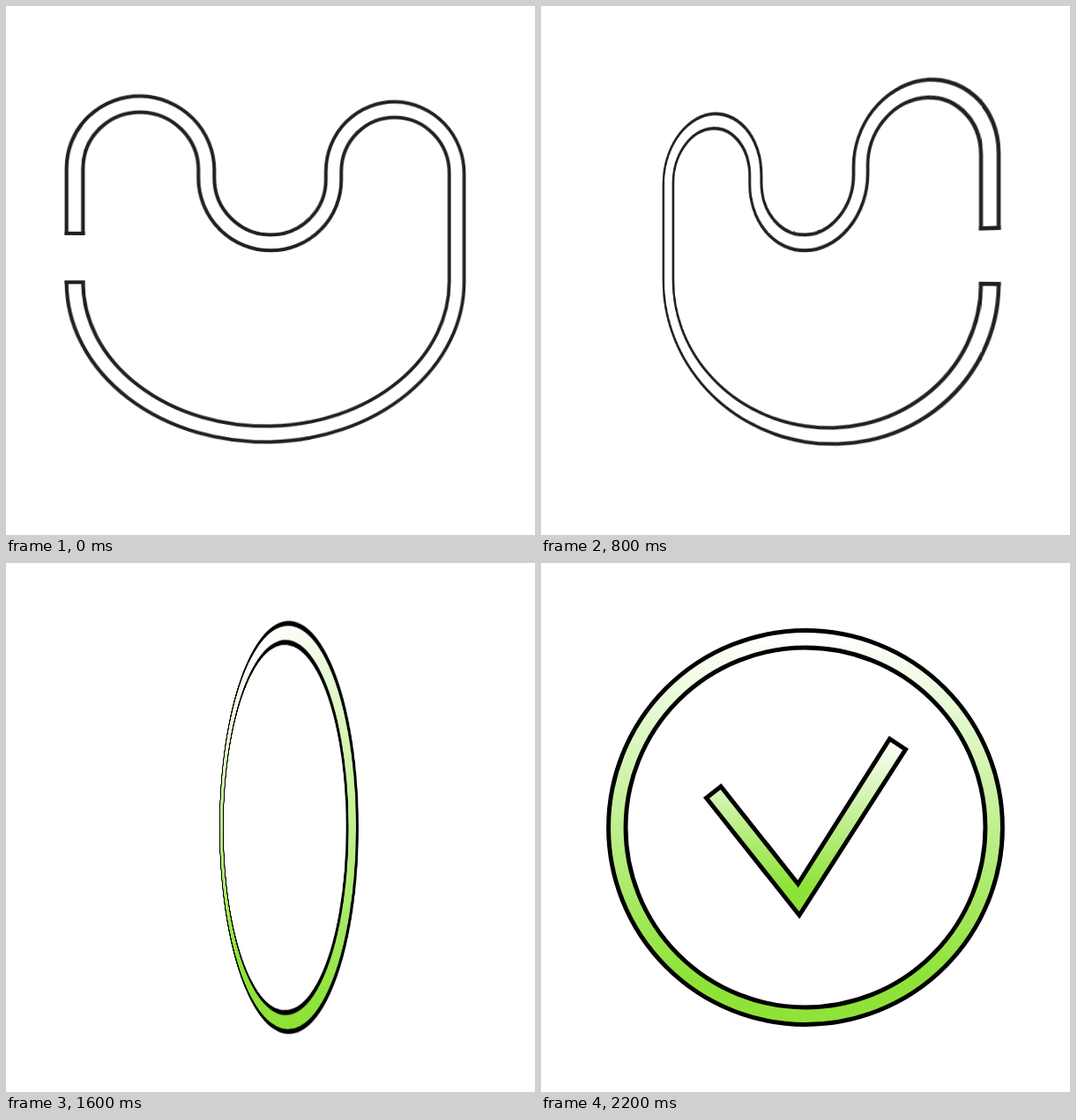
Animation, 600 px wide and 600 px high, one loop 5 s. Source, as an HTML page:

```html
<!DOCTYPE html>
<html lang="en">
<head>
<meta charset="utf-8">
<title>Spinning outline to check mark</title>
<style>
  html, body { margin: 0; width: 100%; height: 100%; overflow: hidden; background: #fff; }
  #stage { position: relative; width: 100%; height: 100%; overflow: hidden; overflow: clip; contain: strict; }
  svg { position: absolute; left: 0; top: 0; width: 100%; height: 100%; }
  path, circle { fill: none; }
</style>
</head>
<body>
<div id="stage">
  <svg id="tube" viewBox="0 0 600 600">
    <defs>
      <path id="line" d="M517.5 261V187A72.5 72.5 0 0 0 372.5 187V196A72.5 72.5 0 0 1 227.5 196V187A72.5 72.5 0 0 0 82.5 187V313A217.5 172.5 0 0 0 517.5 313V311"/>
    </defs>
    <use href="#line" stroke="#231f20" stroke-width="21.8"/>
    <use href="#line" stroke="#fff" stroke-width="13.8"/>
    <path d="M506.6 259h21.8M506.6 313h21.8" stroke="#231f20" stroke-width="4"/>
  </svg>
  <svg id="badge" viewBox="0 0 600 600">
    <defs>
      <linearGradient id="ringFill" gradientUnits="userSpaceOnUse" x1="0" y1="80" x2="0" y2="468">
        <stop stop-color="#fff"/><stop offset="1" stop-color="#8fe338"/>
      </linearGradient>
      <linearGradient id="tickFill" gradientUnits="userSpaceOnUse" x1="0" y1="198" x2="0" y2="367">
        <stop stop-color="#fff"/><stop offset="1" stop-color="#8fe338"/>
      </linearGradient>
      <clipPath id="wipe"><rect id="wipeBox" width="0" height="600"/></clipPath>
    </defs>
    <circle cx="300" cy="300" r="213.7" stroke="#000" stroke-width="24.4"/>
    <circle cx="300" cy="300" r="213.7" stroke="url(#ringFill)" stroke-width="14.6"/>
    <g clip-path="url(#wipe)">
      <polygon points="187.5,266.5 204,253.5 291.5,364 395.5,199.5 413.5,211.5 293,399.5" fill="url(#tickFill)" stroke="#000" stroke-width="5"/>
    </g>
  </svg>
</div>
<script>
const LOOP = 5000, STEP = 100;
const SWAP = 15, FLAT = 20, DONE = 22;
const tube = document.getElementById('tube');
const badge = document.getElementById('badge');
const wipeBox = document.getElementById('wipeBox');

function turn(el, visible, deg, depth) {
  el.style.visibility = visible ? 'visible' : 'hidden';
  el.style.transform = deg ? `perspective(${depth}px) rotateY(${deg}deg)` : 'none';
}

function draw(ms) {
  const step = Math.floor((ms % LOOP) / STEP);
  const showBadge = step >= SWAP;
  turn(tube, !showBadge, (step - 10) * 17.44, 850);
  turn(badge, showBadge, Math.min(step - FLAT, 0) * 17.75, 810);
  wipeBox.setAttribute('width', step >= DONE ? 600 : step > FLAT ? 293 : 0);
}

const start = performance.now();
function tick() {
  draw(performance.now() - start);
  requestAnimationFrame(tick);
}
tick();
</script>
</body>
</html>
```
